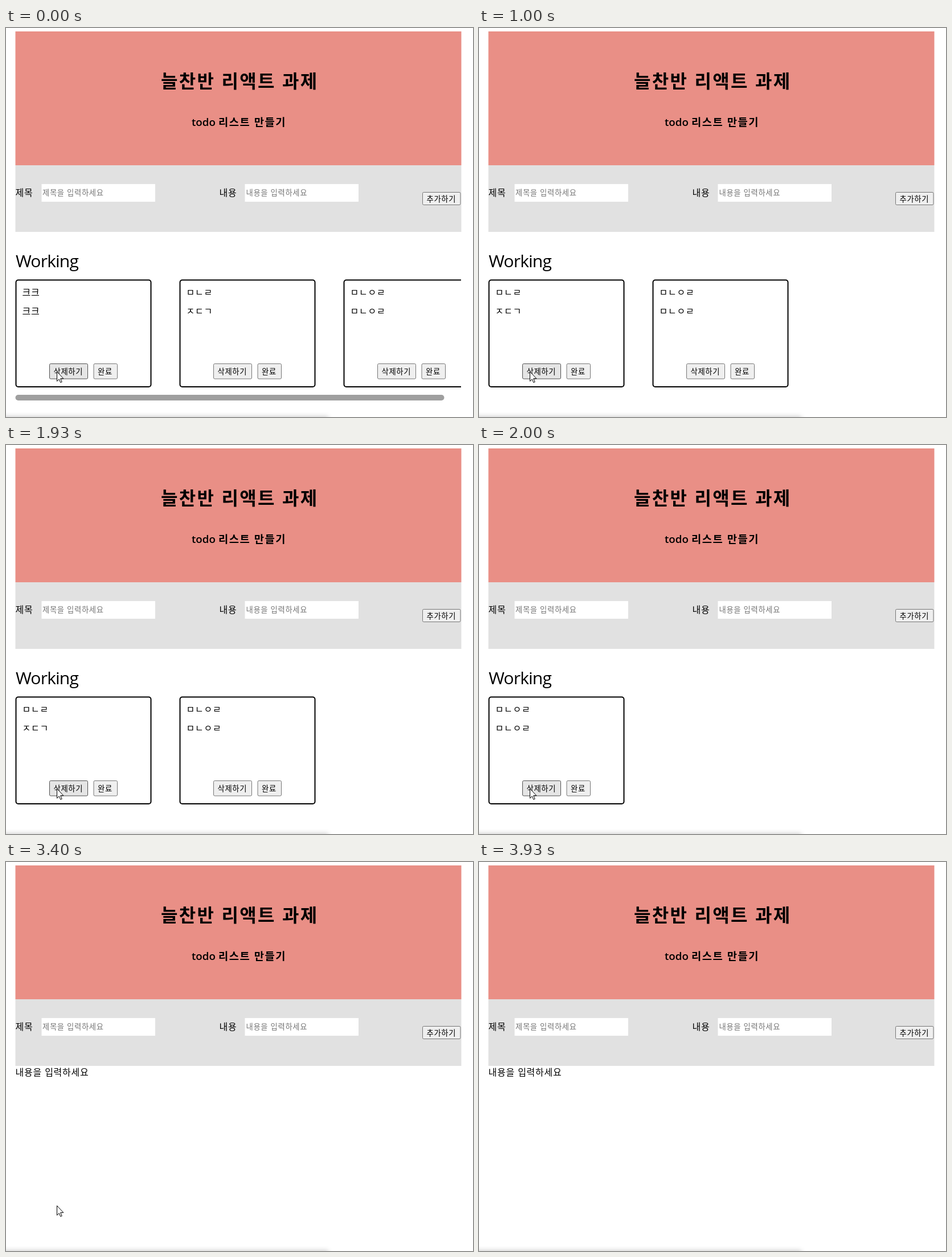
Animation of 820 by 683 pixels, one loop 4.94 s. Source, as an HTML page:

```html
<!DOCTYPE html>
<html lang="ko">
<head>
<meta charset="utf-8">
<title>todo</title>
<style>
  html, body { margin: 0; width: 100%; height: 100%; overflow: hidden; background: #fff; }
  svg { display: block; width: 100%; height: 100%; }
  text { font: 350 16px "Noto Sans CJK KR", "Noto Sans CJK", sans-serif; letter-spacing: .75px; white-space: pre; }
  .title { font-size: 32px; font-weight: 700; letter-spacing: 2.3px; }
  .sub { font-size: 18.72px; font-weight: 700; letter-spacing: 1.5px; }
  .latin { font: 600 18.72px "Open Sans", "Noto Sans", sans-serif; letter-spacing: 0; }
  .head { font: 400 30px "Open Sans", "Noto Sans", sans-serif; letter-spacing: -.8px; }
  .small { font-size: 13.33px; letter-spacing: .65px; }
  .hint { fill: #757575; }
  .btn rect { fill: #efefef; stroke: #767676; }
  .btn.hover rect { fill: #e5e5e5; stroke: #4f4f4f; }
  .btn.active rect { fill: #f5f5f5; stroke: #8d8d8d; }
</style>
</head>
<body>
<svg viewBox="0 0 820 683">
  <defs>
    <clipPath id="list"><rect x="16" y="436" width="783" height="200"/></clipPath>
    <filter id="blur" x="-10%" y="-100%" width="120%" height="300%"><feGaussianBlur stdDeviation="4"/></filter>
  </defs>
  <rect width="820" height="683" fill="#fff"/>
  <rect x="16.5" y="6" width="783" height="235" fill="#e98f86"/>
  <rect x="16.5" y="241" width="783" height="117" fill="#e1e1e1"/>
  <rect x="62.5" y="274" width="199.5" height="31" fill="#fff"/>
  <rect x="419.5" y="274" width="199.5" height="31" fill="#fff"/>
  <g id="form"></g>
  <g id="work">
    <text class="head" x="17" y="420">Working</text>
    <g id="cards" clip-path="url(#list)"></g>
  </g>
  <rect id="bar" x="16.5" y="644" width="753" height="10" rx="5" fill="#9f9f9f"/>
  <text id="empty" x="16.5" y="375">내용을 입력하세요</text>
  <rect x="-10" y="682" width="576" height="14" fill="#000" opacity=".2" filter="url(#blur)"/>
  <path id="cursor" d="M.5.5V17.2L4.2 13.6 6.8 19.5 9.2 18.4 6.7 12.6H11.9Z" fill="#fff" stroke="#000"/>
</svg>
<script>
const LOOP = 4940;
const PRESSES = [[870, 1000], [1400, 1930], [3000, 3330]];
const DELETES = [1000, 2000, 3400];
const CURSOR = [[0, 89, 603], [3730, 60, 612], [3800, 23, 623]];
const CURSOR_GONE = 3930;
const TODOS = [['크크', '크크'], ['ㅁㄴㄹ', 'ㅈㄷㄱ'], ['ㅁㄴㅇㄹ', 'ㅁㄴㅇㄹ']];

const $ = id => document.getElementById(id);
const show = (el, on) => el.setAttribute('visibility', on ? 'inherit' : 'hidden');
const label = (x, y, s, cls = '') => `<text class="${cls}" x="${x}" y="${y}">${s}</text>`;
const button = (x, y, w, h, s) => `<g class="btn">
  <rect x="${x + .5}" y="${y + .5}" width="${w - 1}" height="${h - 1}" rx="2"/>
  ${label(x + 7.5, y + h / 2 + 5.2, s, 'small')}</g>`;

$('form').innerHTML =
  label(272, 105, '늘찬반 리액트 과제', 'title') +
  label(326, 172, 'todo', 'latin') +
  label(373, 172, '리스트 만들기', 'sub') +
  label(16.5, 295, '제목') +
  label(64, 293.5, '제목을 입력하세요', 'small hint') +
  label(374.5, 295, '내용') +
  label(421.5, 293.5, '내용을 입력하세요', 'small hint') +
  button(731, 288, 67.5, 23, '추가하기');

$('cards').innerHTML = TODOS.map(([title, body]) => `<g>
  <rect x="17.5" y="442.5" width="237" height="187.5" rx="4" fill="#fff" stroke="#000" stroke-width="2"/>
  ${label(28.5, 470, title)}${label(28.5, 503, body)}
  ${button(76, 589, 68, 27.5, '삭제하기')}${button(153.5, 589, 42.5, 27.5, '완료')}</g>`).join('');

const cards = [...$('cards').children];

function draw(t) {
  const removed = DELETES.filter(d => t >= d).length;
  const pressed = PRESSES.some(([a, b]) => t >= a && t < b);

  cards.forEach((card, i) => {
    show(card, i >= removed);
    card.setAttribute('transform', `translate(${(i - removed) * 288} 0)`);
    const state = i !== removed ? '' : pressed ? ' active' : ' hover';
    card.querySelector('.btn').setAttribute('class', 'btn' + state);
  });
  show($('work'), removed < TODOS.length);
  show($('bar'), removed === 0);
  show($('empty'), removed === TODOS.length);

  const [, x, y] = CURSOR.filter(c => t >= c[0]).pop();
  $('cursor').setAttribute('transform', `translate(${x} ${y})`);
  show($('cursor'), t < CURSOR_GONE);
}

const start = performance.now();
function tick() {
  draw((performance.now() - start) % LOOP);
  requestAnimationFrame(tick);
}
tick();
</script>
</body>
</html>
```
